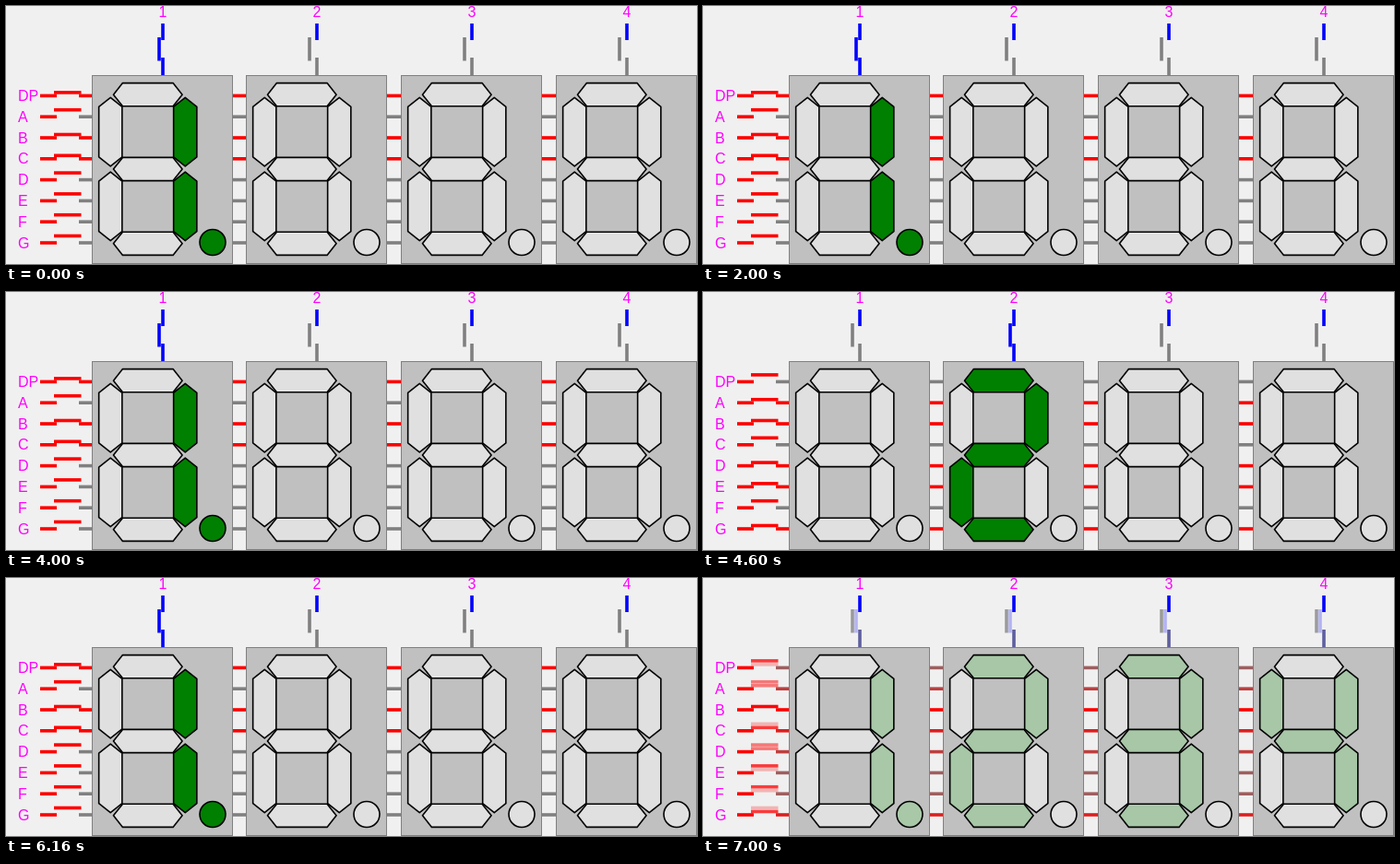
An HTML page that plays this animation: 749 px wide and 280 px high, repeating every 8 s.

```html
<!DOCTYPE html>
<html lang="en">
<head>
<meta charset="utf-8">
<title>Multiplexed seven-segment display</title>
<style>
  html, body { margin: 0; width: 100%; height: 100%; overflow: hidden; background: #f0f0f0; }
  svg { display: block; }
  text { font: 16px "Liberation Sans", Arial, sans-serif; fill: #f0f; }
</style>
</head>
<body>
<svg id="stage" width="749" height="280" viewBox="0 0 749 280"></svg>
<script>
const RED = '#f00', BLUE = '#00f', GRAY = '#808080', GREEN = '#008000', OFF = '#e0e0e0';
const LOOP = 8000, WIRE = 3.6;
const PINS = ['DP', 'A', 'B', 'C', 'D', 'E', 'F', 'G'];
const LIT = ['DP B C', 'A B D E G', 'A B C D G', 'B C F G'].map(pins => pins.split(' '));
const STEPS = [500, 250, 120, 60, 30];

const pinY = i => 97.4 + 22.8 * i;
const digitX = i => Math.floor(167.7 * i);
const line = (x1, y1, x2, y2, color) =>
  `<path d="M${x1} ${y1}L${x2} ${y2}" stroke="${color}" stroke-width="${WIRE}"/>`;

// Segments A to F run clockwise around the digit, G is its centre bar.
function segment(name, fill) {
  const angle = 'ABCDEF'.indexOf(name) * Math.PI / 3;
  const dx = name === 'G' ? 0 : Math.round(Math.sin(angle));
  const dy = name === 'G' ? 0 : Math.round(-2 * Math.cos(angle));
  const x = 153.75 + dx * 40.5, y = 177 + dy * 40.4;
  return `<path d="M-37.3 0L-27.3 -12.6H27.3L37.3 0L27.3 12.6H-27.3Z" fill="${fill}"
    transform="translate(${x} ${y}) rotate(${dx * 90})"/>`;
}

function pinRow(pin, i, on) {
  const y = pinY(i), barY = y - (on ? 3.5 : 7.5), color = on ? RED : GRAY;
  const links = LIT.slice(1).map((_, d) => line(digitX(d) + 246, y, digitX(d) + 261, y, color));
  return line(37, y, 55, y, RED) + line(52, barY, 81.5, barY, RED) +
    line(79, y, 93, y, color) + links.join('');
}

function digit(i, active) {
  const color = active ? BLUE : GRAY, barX = active ? 166 : 162;
  const fill = pin => active && LIT[i].includes(pin) ? GREEN : OFF;
  return `<g transform="translate(${digitX(i)})">
    ${line(170, 19, 170, 37, BLUE)}
    ${line(barX, 34, barX, 59.5, color)}
    ${line(170, 56, 170, 75, color)}
    <rect x="93.5" y="75.5" width="152" height="204" fill="#c0c0c0" stroke="${GRAY}"/>
    <g stroke="#000" stroke-width="1.6" stroke-linejoin="round">
      ${PINS.slice(1).map(pin => segment(pin, fill(pin))).join('')}
      <circle cx="224" cy="256.5" r="14" fill="${fill('DP')}"/>
    </g>
  </g>`;
}

function scene(active) {
  return '<g class="scene"><rect width="749" height="280" fill="#f0f0f0"/>' +
    PINS.map((pin, i) => pinRow(pin, i, LIT[active].includes(pin))).join('') +
    LIT.map((_, i) => digit(i, i === active)).join('') + '</g>';
}

const labels = PINS.map((pin, i) => `<text x="13" y="${pinY(i) + 5.5}">${pin}</text>`).join('') +
  LIT.map((_, i) => `<text x="${digitX(i) + 170}" y="12" text-anchor="middle">${i + 1}</text>`).join('');

const stage = document.getElementById('stage');
stage.innerHTML = LIT.map((_, i) => scene(i)).join('') + labels;
const scenes = stage.querySelectorAll('.scene');

// The n-th speed scans all digits n times; -1 means too fast to tell them apart.
function activeDigit(t) {
  for (const [i, step] of STEPS.entries()) {
    const duration = (i + 1) * LIT.length * step;
    if (t < duration) return Math.floor(t / step) % LIT.length;
    t -= duration;
  }
  return -1;
}

function draw() {
  const active = activeDigit(performance.now() % LOOP);
  // Stacked opacities 1, 1/2, 1/3, 1/4 give an equal average.
  scenes.forEach((g, i) => g.setAttribute('opacity', active < 0 ? 1 / (i + 1) : +(i === active)));
  requestAnimationFrame(draw);
}
draw();
</script>
</body>
</html>
```
